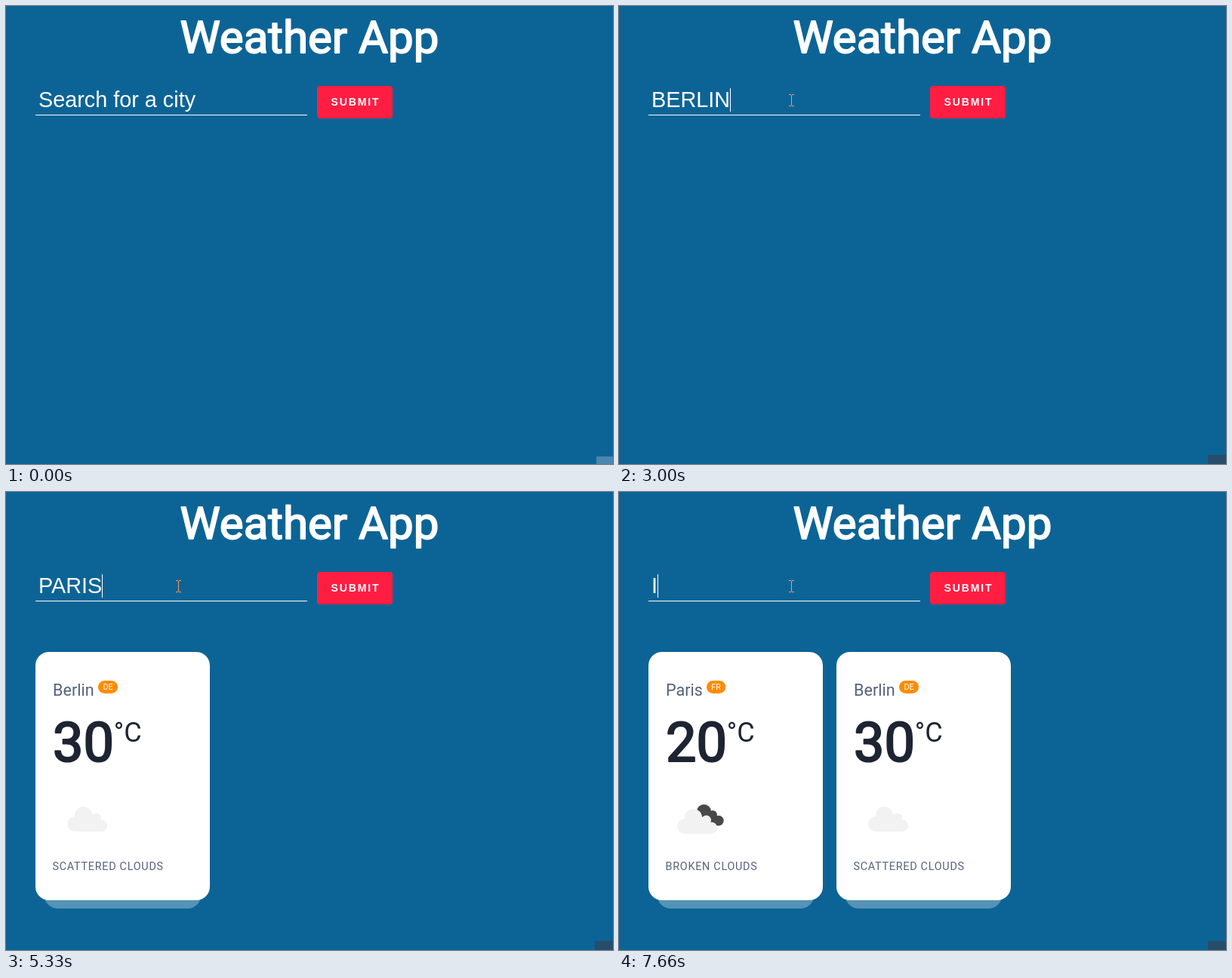
These frames come from a looping animation (804 px wide and 607 px high, 7.99 s). An HTML page:

```html
<!DOCTYPE html>
<html lang="en">
<head>
<meta charset="utf-8">
<title>Weather App</title>
<style>
  html, body { margin: 0; width: 100%; height: 100%; overflow: hidden; background: #0c6496; }
  svg { display: block; width: 804px; height: 607px; font-family: Roboto, sans-serif; }
  text { white-space: pre; }
  .heavy { stroke-width: .031em; stroke-linejoin: round; }
  .title { font-size: 60px; fill: #fff; stroke: #fff; text-anchor: middle; }
  .field { font: 28.8px "Liberation Sans", Arial, sans-serif; fill: #fff; }
  .submit { font: bold 14px "Liberation Sans", Arial, sans-serif; letter-spacing: 1.9px; fill: #fff; }
  .city { font-size: 21.6px; fill: #53627c; }
  .code { font-size: 10.8px; fill: #fff; text-anchor: middle; }
  .temp { font-size: 72px; fill: #1e2432; stroke: #1e2432; }
  .unit { font-size: 36px; fill: #1e2432; }
  .sky { font-size: 14.4px; letter-spacing: .05em; fill: #53627c; }
</style>
</head>
<body>
<svg viewBox="0 0 804 607">
  <defs>
    <g id="cloud" fill="#f2f2f2">
      <circle cx="91" cy="440" r="10"/>
      <circle cx="102.5" cy="428.5" r="11.5"/>
      <circle cx="119.5" cy="432" r="6.5"/>
      <circle cx="126.5" cy="442.3" r="7.7"/>
      <path d="M91 450V436L103 425L119 429L127 437V450Z"/>
    </g>
    <g id="dark-cloud" fill="#484849">
      <circle cx="112.5" cy="423.5" r="9.5"/>
      <circle cx="124" cy="428" r="6"/>
      <circle cx="132" cy="435.5" r="6.7"/>
      <path d="M106 424L113 421L124 426L132 433V442.2H112Z"/>
    </g>
  </defs>
  <rect width="804" height="607" fill="#0c6496"/>
  <text class="title heavy" x="402" y="62">Weather App</text>
  <rect x="39" y="144" width="360" height="1" fill="#fff"/>
  <text id="field" class="field" x="43" y="134"></text>
  <rect id="caret" y="109" width="1" height="31" fill="#fff"/>
  <rect x="412" y="106" width="100" height="43" rx="4" fill="#ff1e42"/>
  <text class="submit" x="430.5" y="132">SUBMIT</text>
  <g id="paris"></g>
  <g id="berlin"></g>
  <rect id="corner" width="24" height="12"/>
  <path id="arrow" transform="translate(290 208)" fill="#fff" stroke="#000"
    d="M.5 .5V16.2L4.2 12.7L6.8 18.5L9.2 17.5L6.7 11.9H11.5Z"/>
  <path id="beam" d="M0 0H3V1H4V0H7V1H4V15H7V16H4V15H3V16H0V15H3V1H0Z"/>
</svg>
<script>
const LOOP = 7990;
const $ = id => document.getElementById(id);

// start time, typed text, caret x (0 = hidden)
const typing = [
  [0, '', 0], [1000, '', 43], [1670, '', 0],
  [2000, 'BE', 81], [2330, 'BER', 102], [2670, 'BERLI', 126], [3000, 'BERLIN', 147],
  [3330, '', 0], [4000, '', 43],
  [4330, 'PA', 79], [4660, 'PAR', 100], [4990, 'PARI', 108], [5330, 'PARIS', 127],
  [5650, '', 0], [6340, '', 43], [6670, '', 0], [7340, '', 43], [7660, 'I', 51]
];
// start time, x, y of the text pointer
const moves = [[0, 237, 135], [1000, 226, 117], [1330, 225, 117]];

const card = (city, code, codeX, codeW, temp, sky, icon) => `
  <rect x="50.6" y="507" width="207.8" height="45" rx="18" fill="#fff" opacity=".3"/>
  <rect x="39" y="212" width="231" height="329" rx="18" fill="#fff"/>
  <text class="city" x="62" y="270">${city}</text>
  <rect x="${codeX}" y="250" width="${codeW}" height="17" rx="8.5" fill="#ff8c00"/>
  <text class="code" x="${codeX + codeW / 2}" y="262">${code}</text>
  <text class="temp heavy" x="62" y="357">${temp}</text>
  <text class="unit" x="142.8" y="331">°C</text>
  ${icon}
  <text class="sky" x="61.5" y="501">${sky}</text>`;

$('berlin').innerHTML = card('Berlin', 'DE', 122, 26, 30, 'SCATTERED CLOUDS', '<use href="#cloud"/>');
$('paris').innerHTML = card('Paris', 'FR', 116, 25.2, 20, 'BROKEN CLOUDS',
  '<use href="#dark-cloud"/><use href="#cloud" x="-4" y="3"/>');

const at = (list, t) => list.findLast(step => step[0] <= t);
const show = (id, on) => $(id).setAttribute('visibility', on ? 'visible' : 'hidden');
const set = (id, attrs) => {
  for (const name in attrs) $(id).setAttribute(name, attrs[name]);
};

function draw(t) {
  const [, text, caretX] = at(typing, t);
  const [, x, y] = at(moves, t);
  const value = text || 'Search for a city';
  if ($('field').textContent !== value) $('field').textContent = value;
  show('caret', caretX);
  set('caret', { x: caretX });

  show('berlin', t >= 3330);
  show('paris', t >= 5650);
  set('berlin', { transform: `translate(${t >= 5650 ? 249 : 0} 0)` });

  show('arrow', t >= 330 && t < 670);
  show('beam', t >= 670);
  set('beam', {
    transform: `translate(${x} ${y})`,
    fill: text || x > 230 ? '#f39b69' : '#4b5560'
  });
  set('corner', t < 330
    ? { x: 782, y: 597, fill: '#4a86ad' }
    : { x: 780, y: 595, fill: '#274d69' });
}

const start = performance.now();
function tick() {
  draw((performance.now() - start) % LOOP);
  requestAnimationFrame(tick);
}
tick();
</script>
</body>
</html>
```
